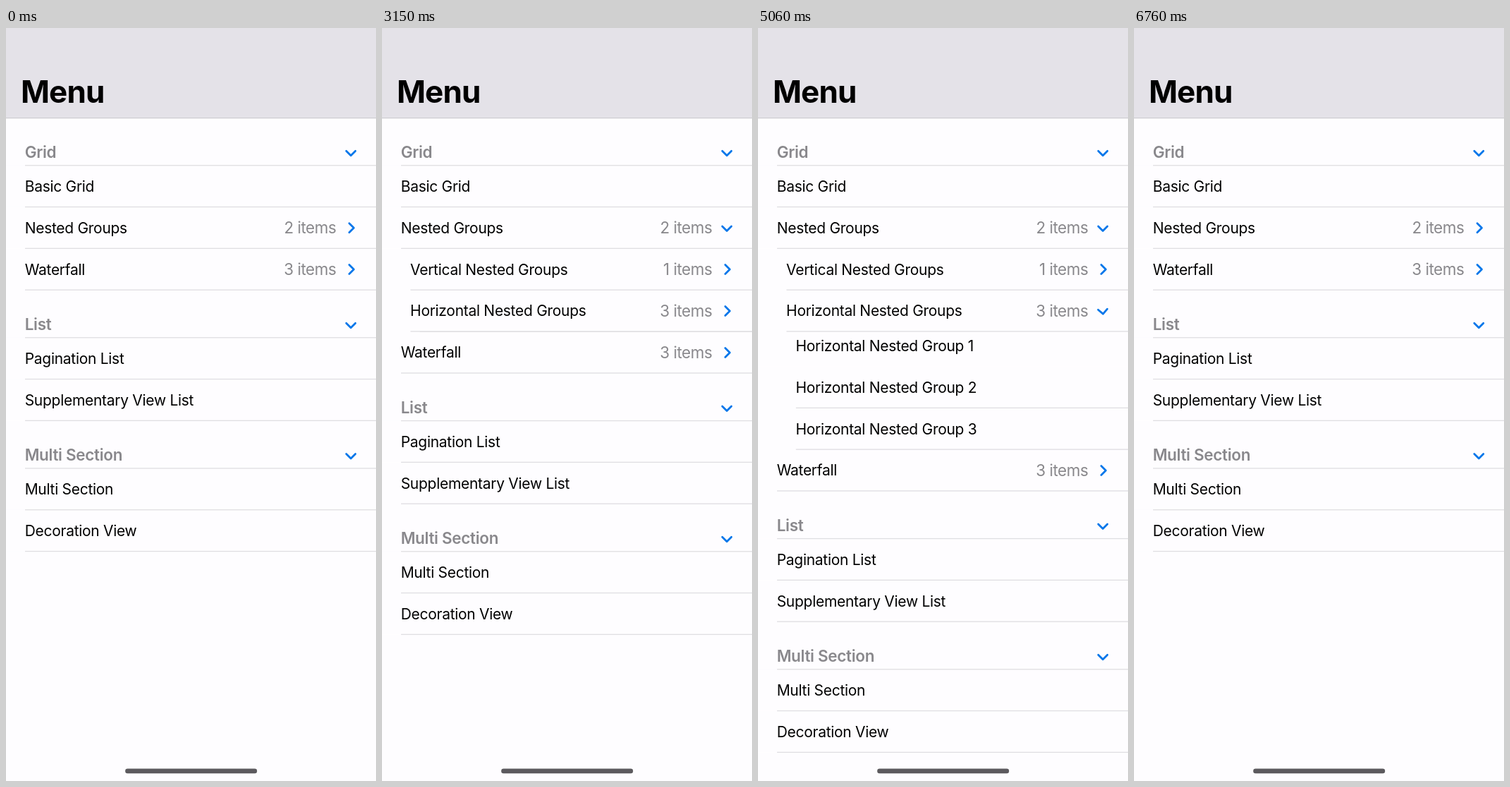
An HTML page that plays this animation: 525 px wide and 1067 px high, repeating every 8000 ms.

```html
<!DOCTYPE html>
<html lang="en">
<head>
<meta charset="utf-8">
<title>Menu</title>
<style>
  html, body { margin: 0; width: 100%; height: 100%; overflow: hidden; background: #fefdff; }
  svg { display: block; font: 21px Inter, sans-serif; font-optical-sizing: none; letter-spacing: -.29px; }
  .cell { fill: #fefdff; }
  .line { fill: #dfdee2; }
  .count { fill: #89888c; font-size: 22.5px; text-anchor: end; letter-spacing: -.5px; }
  .section { fill: #89888c; font-size: 22.5px; font-weight: 600; letter-spacing: -.32px; }
  .title { font-size: 44px; font-weight: 700; letter-spacing: -.9px; }
  .chevron { fill: none; stroke: #0877ea; stroke-width: 2.8; stroke-linecap: round; stroke-linejoin: round; }
</style>
</head>
<body>
<svg width="525" height="1067" viewBox="0 0 525 1067">
  <g id="list"></g>
  <rect width="525" height="127.2" fill="#e4e2e8"/>
  <rect y="127" width="525" height="1.2" fill="#cdccd1"/>
  <text class="title" x="21" y="106.3">Menu</text>
  <rect x="169.2" y="1049.6" width="187" height="6.6" rx="3.3" fill="#5c5a5e"/>
</svg>
<script>
const LOOP = 8000, TOP = 127.1, ROW = 58.8, SECTION = 67.6, STEP = 30, SPAN = 240;

// Each group opens and closes once per loop; lead is the time already eased at the first step.
const groups = [
  { size: 2, open: { at: 1390, lead: 40 }, close: { at: 6520, lead: 6 } },
  { size: 3, open: { at: 3150, lead: 6 }, close: { at: 5060, lead: 46 } },
];

const section = label => ({ label, isSection: true, height: SECTION });
const item = (label, extra) => ({ label, depth: 0, height: ROW, ...extra });
const leaf = n => item('Horizontal Nested Group ' + n, { depth: 2, parent: groups[1], first: n === 1 });

const rows = [
  section('Grid'),
  item('Basic Grid'),
  item('Nested Groups', { count: 2, group: groups[0] }),
  item('Vertical Nested Groups', { depth: 1, count: 1, parent: groups[0], first: true }),
  item('Horizontal Nested Groups', { depth: 1, count: 3, parent: groups[0], group: groups[1] }),
  leaf(1), leaf(2), leaf(3),
  item('Waterfall', { count: 3 }),
  section('List'),
  item('Pagination List'),
  item('Supplementary View List'),
  section('Multi Section'),
  item('Multi Section'),
  item('Decoration View'),
];

const list = document.getElementById('list');

function add(parent, tag, attrs, text = '') {
  const node = document.createElementNS('http://www.w3.org/2000/svg', tag);
  for (const name in attrs) node.setAttribute(name, attrs[name]);
  node.textContent = text;
  return parent.appendChild(node);
}

// Local origin is the bottom edge of the row.
function build(row) {
  const { label, isSection, depth = 0, height, count } = row;
  const x = 27 + depth * 13.4;
  row.node = add(list, 'g', {});
  add(row.node, 'rect', { class: 'cell', y: -height - 1, width: 525, height: height + 1 });
  add(row.node, 'text', { class: isSection ? 'section' : '', x: x - .3, y: isSection ? -10.5 : -21.6 }, label);
  row.line = add(row.node, 'rect', { class: 'line', x, y: -.6, width: 525 - x, height: 1.3 });
  if (count) add(row.node, 'text', { class: 'count', x: 468.3, y: -21 }, count + ' items');
  if (count || isSection) row.chevron = add(row.node, 'path', { class: 'chevron', d: 'M-3-6.5 3.5 0-3 6.5' });
}

// Cubic ease-in-out with control points (.42, 0) and (.58, 1).
function ease(x) {
  let s = x;
  for (let i = 0; i < 4; i++) {
    s -= (((.52 * s - .78) * s + 1.26) * s - x) / ((1.56 * s - 1.56) * s + 1.26);
  }
  return s * s * (3 - 2 * s);
}

function progress(time, { at, lead }) {
  if (time < at) return 0;
  const elapsed = Math.min(SPAN, Math.floor((time - at) / STEP) * STEP);
  return ease((lead + elapsed) / (lead + SPAN));
}

function draw(now) {
  const time = now % LOOP;
  for (const group of groups) {
    group.shown = progress(time, group.open) - progress(time, group.close);
    group.closing = time >= group.close.at;
  }
  let y = TOP;
  for (const { node, line, chevron, height, isSection, parent, first, group } of rows) {
    if (first) y -= parent.size * ROW * (1 - parent.shown);
    y += height;
    node.setAttribute('transform', `translate(0 ${y})`);
    if (parent) node.style.display = parent.shown > 0 ? '' : 'none';
    if (first) line.style.display = parent.closing ? 'none' : '';
    if (chevron) {
      const turn = isSection ? 1 : group ? group.shown : 0;
      const cy = isSection ? -17.4 : -29 + .8 * turn;
      chevron.setAttribute('transform', `translate(${490 - .7 * turn} ${cy}) rotate(${90 * turn})`);
    }
  }
  requestAnimationFrame(draw);
}

// Upper rows are painted last so that children slide out from beneath them.
[...rows].reverse().forEach(build);
draw(0);
</script>
</body>
</html>
```
